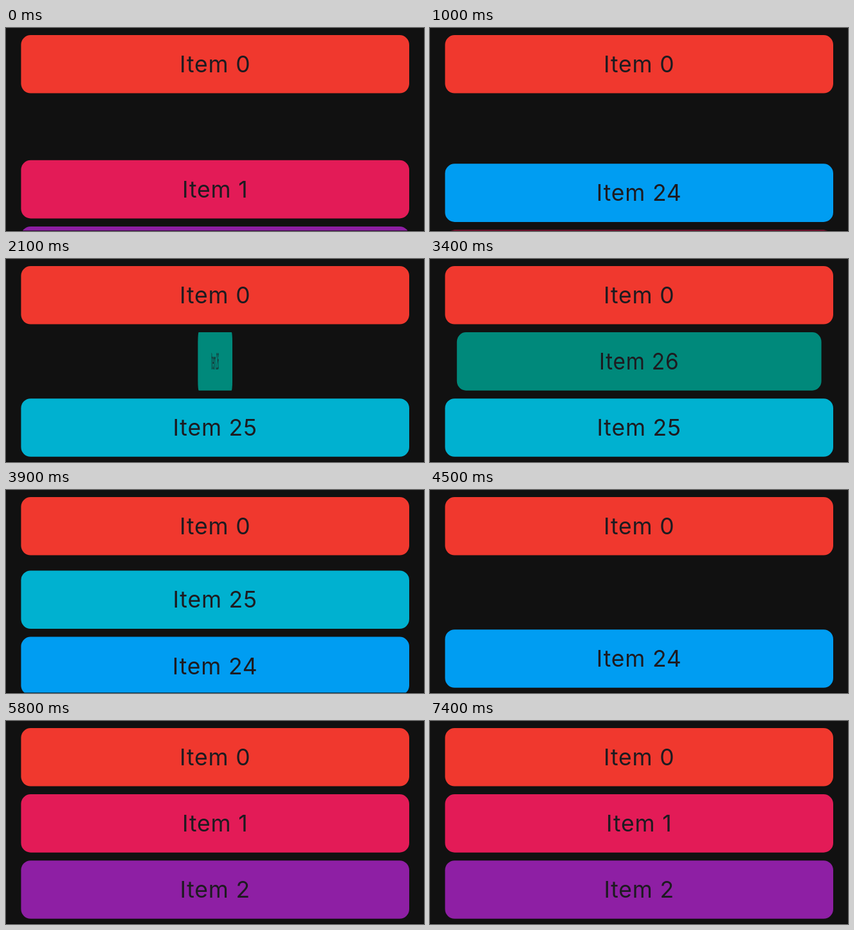
Recreate the animation shown at these times as an HTML page with a canvas. Size 650 by 316 pixels, loop 7.5 s.

```html
<!DOCTYPE html>
<html lang="en">
<head>
<meta charset="utf-8">
<title>Animated list</title>
<style>
  html, body { margin: 0; width: 100%; height: 100%; overflow: hidden; background: #111; }
  canvas { display: block; width: 100%; height: 100%; }
</style>
</head>
<body>
<canvas id="stage" width="650" height="316"></canvas>
<script>
const ctx = document.getElementById('stage').getContext('2d');

const LOOP = 7500, TICK = 100, PHASE = 300;
const CENTER = 325.2, TOP = 11, STEP = 103.1;
const CARD = { w: 603.6, h: 90.6, r: 15 };
const COLORS = {
  0: '#f0382e', 1: '#e31b57', 2: '#8e1fa4',
  24: '#009df2', 25: '#00b1d0', 26: '#00897b'
};

// Inserting slides the rest down, then flips in; removing does the reverse.
const EVENTS = [
  { at: -267, id: 24, add: true },
  { at: 717, id: 25, add: true },
  { at: 1783, id: 26, add: true },
  { at: 3333, id: 26, add: false },
  { at: 4200, id: 25, add: false },
  { at: 5180, id: 24, add: false }
];

const clamp = v => Math.min(1, Math.max(0, v));

function listAt(t) {
  const ids = [1, 2];
  let flipping = null, scale = 1, offset = 0;
  for (const { at, id, add } of EVENTS) {
    if (t < at) break;
    const first = clamp((t - at) / PHASE);
    const second = clamp((t - at - PHASE) / PHASE);
    flipping = id;
    if (add) {
      ids.unshift(id);
      scale = Math.sin(second * Math.PI / 2);
      offset = first - 1;
    } else if (first < 1) {
      scale = Math.cos(first * Math.PI / 2);
      offset = 0;
    } else {
      ids.shift();
      flipping = null;
      offset = 1 - second;
    }
  }
  return ids.map((id, i) => id === flipping
    ? { id, row: i + 1, scale }
    : { id, row: i + 1 + offset, scale: 1 });
}

function drawCard({ id, row, scale }) {
  const y = TOP + row * STEP;
  if (scale < 0.001 || y > 316) return;
  ctx.save();
  ctx.translate(CENTER, y);
  ctx.scale(scale, 1);
  ctx.fillStyle = COLORS[id];
  ctx.beginPath();
  ctx.roundRect(-CARD.w / 2, 0, CARD.w, CARD.h, CARD.r);
  ctx.fill();
  ctx.fillStyle = '#1d1b20';
  ctx.fillText('Item ' + id, 0, 58);
  ctx.restore();
}

function draw(t) {
  ctx.fillStyle = '#111';
  ctx.fillRect(0, 0, 650, 316);
  ctx.font = '400 35.5px Inter, Roboto, sans-serif';
  ctx.letterSpacing = '0.8px';
  ctx.textAlign = 'center';
  listAt(t).forEach(drawCard);
  drawCard({ id: 0, row: 0, scale: 1 });
  // Dark edge along the bottom of the stage
  ctx.fillStyle = 'rgba(0, 0, 0, 0.6)';
  ctx.fillRect(0, 315, 650, 1);
}

const start = performance.now();
function frame() {
  const t = (performance.now() - start) % LOOP;
  draw(Math.floor(t / TICK) * TICK);
  requestAnimationFrame(frame);
}
frame();
</script>
</body>
</html>
```
